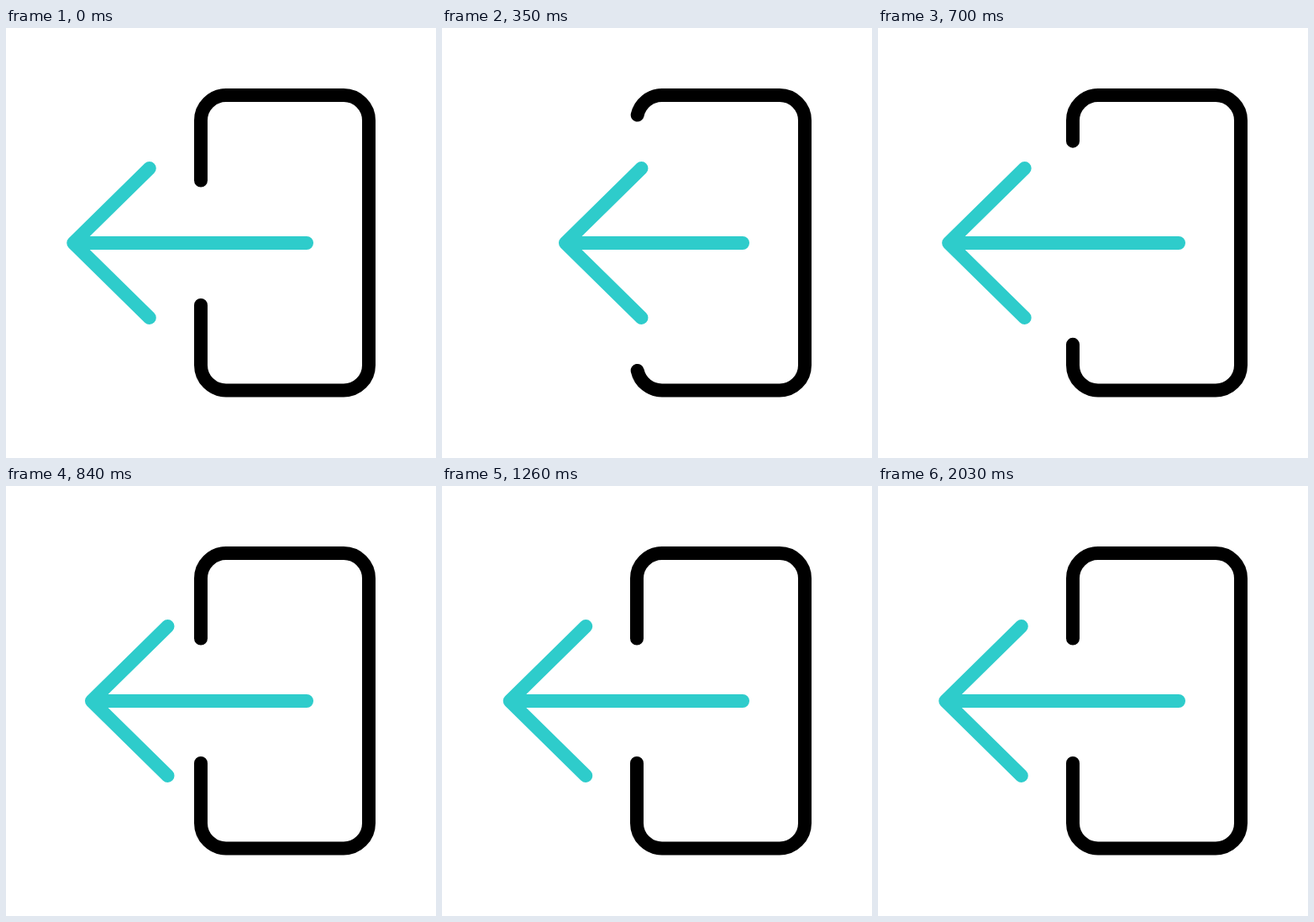
An HTML page for the animation above (2100 ms loop, 512 by 512 pixels).

```html
<!DOCTYPE html>
<html lang="en">
<head>
<meta charset="utf-8">
<title>Exit icon</title>
<style>
  html, body { margin: 0; width: 100%; height: 100%; overflow: hidden; background: #fff; }
  svg { display: block; width: 100%; height: 100%; }
  path { fill: none; stroke-width: 16; stroke-linecap: round; stroke-linejoin: round; }
</style>
</head>
<body>
<svg viewBox="0 0 512 512">
  <path id="door" stroke="#000" pathLength="100"
    d="M232 181.5V110A30 30 0 0 1 262 80H402A30 30 0 0 1 432 110V401.5A30 30 0 0 1 402 431.5H262A30 30 0 0 1 232 401.5V330"/>
  <path id="arrow" stroke="#2ecccb"/>
</svg>
<script>
const LOOP = 2100, STEP = 70;
const door = document.getElementById('door');
const arrow = document.getElementById('arrow');

// [time in ms, value] pairs, eased in and out between neighbours
const push = [[0, 0], [525, 90], [560, 90], [720, 0], [945, 39.5], [1240, 0], [1380, 8], [1540, 0]];
const trim = [[0, 0], [175, 0], [560, 20], [770, 0]];

function valueAt(keys, t) {
  const i = keys.findIndex(k => k[0] > t);
  if (i < 0) return keys[keys.length - 1][1];
  const [t0, a] = keys[i - 1], [t1, b] = keys[i];
  const x = (t - t0) / (t1 - t0);
  return a + (b - a) * x * x * (3 - 2 * x);
}

function draw(t) {
  const tip = 80.3 + valueAt(push, t);
  arrow.setAttribute('d', `M${tip + 90.5} 167L${tip} 256L${tip + 90.5} 345M${tip} 256H358`);
  const cut = valueAt(trim, t);
  door.setAttribute('stroke-dasharray', `${100 - 2 * cut} 100`);
  door.setAttribute('stroke-dashoffset', -cut);
}

const start = performance.now();
function frame() {
  const t = (performance.now() - start) % LOOP;
  draw(Math.floor(t / STEP) * STEP);
  requestAnimationFrame(frame);
}
frame();
</script>
</body>
</html>
```
